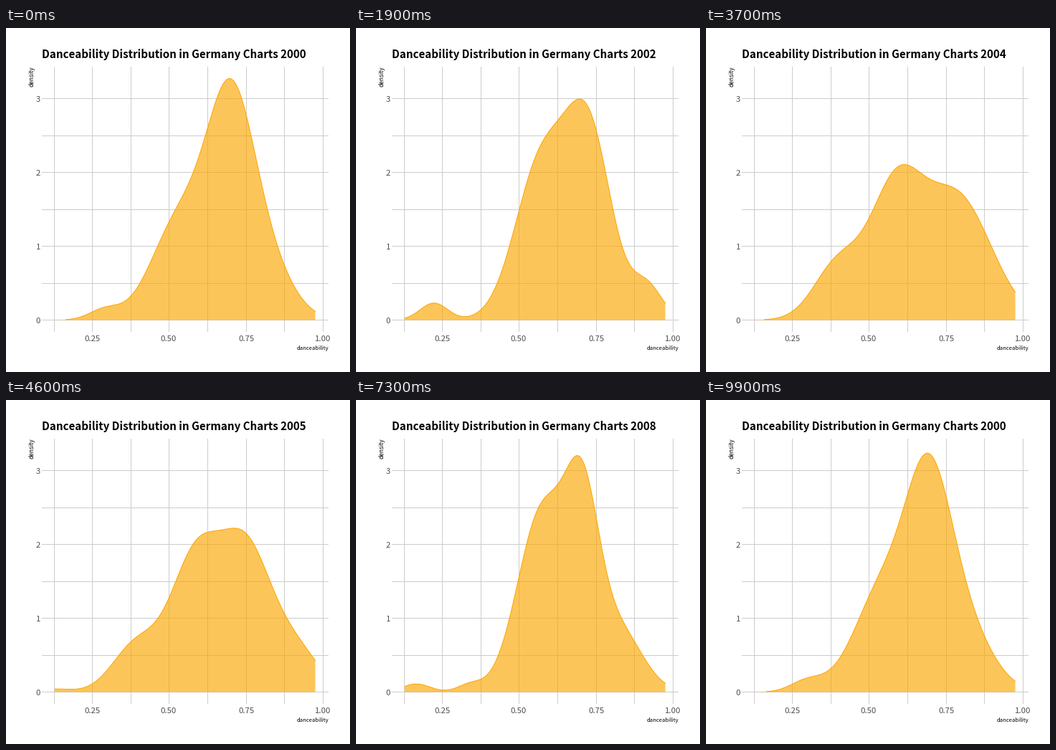
Write a matplotlib script that moves like this. It is 480 px wide and 480 px high and loops after 10000 ms.

```python
import numpy as np
import matplotlib.pyplot as plt
from matplotlib.animation import FuncAnimation

SIZE, DPI = 480, 96
PT = 72 / DPI                        # points per pixel
LEFT, RIGHT, TOP, BOTTOM = 50, 450, 54, 424
FONT = "Noto Sans CJK JP"
ORANGE, FILL, GRID, GREY = "#ffa500", "#faa600", "#cccccc", "#4d4d4d"
X = np.linspace(0.127, 0.975, 512)


def px(value):
    return 120.7 + (value - 0.25) * 428.8


def py(density):
    return 407.5 - 103 * density


def bumps(*parts):
    """Sum of bell curves given as (height, centre, width)."""
    return sum(h * np.exp(-((X - c) / w) ** 2 / 2) for h, c, w in parts)


curves = {
    2000: bumps((.14, .29, .05), (1.29, .53, .09), (2.9, .70, .079),
                (.57, .83, .08)),
    2002: bumps((.23, .222, .045), (2.08, .57, .084), (2.5, .725, .075),
                (.45, .915, .05)),
    2004: bumps((.74, .397, .077), (1.7, .585, .085), (1.66, .786, .11)),
    2006: bumps((.08, .13, .05), (.52, .385, .075), (1.78, .585, .08),
                (2.24, .744, .076), (.56, .93, .07)),
    2008: bumps((.11, .165, .045), (.1, .34, .04), (2.45, .575, .08),
                (2.2, .705, .055), (.85, .82, .078)),
    2009: bumps((.4, .31, .06), (2.2, .535, .083), (1.85, .74, .1)),
    2010: bumps((.24, .33, .06), (1.15, .535, .075), (2.9, .675, .075),
                (.8, .84, .085)),
}
for year in (2001, 2003, 2005, 2007):
    curves[year] = (curves[year - 1] + curves[year + 1]) / 2

YEARS = list(range(2000, 2011))
STARTS = [5, 15] + list(range(25, 98, 9))
STEPS = [5, 5] + [4] * 9


def state(frame):
    """Return the title year and the density curve of a frame."""
    year, curve = YEARS[0], curves[YEARS[0]]
    for i, (start, steps) in enumerate(zip(STARTS, STEPS)):
        if frame < start:
            break
        t = min((frame - start + 1) / steps, 1)
        here, after = YEARS[i], YEARS[(i + 1) % len(YEARS)]
        year = after if t >= 0.5 else here
        curve = (1 - t) * curves[here] + t * curves[after]
    return year, curve


fig = plt.figure(figsize=(SIZE / DPI, SIZE / DPI), dpi=DPI, facecolor="white")
ax = fig.add_axes([0, 0, 1, 1])
ax.set_xlim(0, SIZE)
ax.set_ylim(SIZE, 0)
ax.axis("off")


def label(x, y, text, size, **style):
    return ax.text(x, y, text, fontsize=size * PT, family=FONT, **style)


def grid_line(xs, ys):
    ax.plot(xs, ys, color=GRID, lw=PT, snap=False,
            solid_capstyle="butt", zorder=1)


# Grid lines sit on pixel centres so that they stay crisp
for k in range(1, 9):
    x = np.floor(px(k / 8)) + 0.5
    grid_line([x, x], [TOP, BOTTOM])
    if k % 2 == 0:
        label(x - 0.5, 437, f"{k / 8:.2f}", 11.3, color=GREY,
              ha="center", va="baseline")
for k in range(7):
    y = np.floor(py(k / 2)) + 0.5
    grid_line([LEFT, RIGHT], [y, y])
    if k % 2 == 0:
        label(48, y + 4.5, str(k // 2), 11.3, color=GREY,
              ha="right", va="baseline")

label(RIGHT, 449, "danceability", 7.7, ha="right", va="baseline")
label(40.5, TOP - 1, "density", 8.4, rotation=90, ha="right", va="top")
title = label(LEFT, 42, "", 15.1, weight="bold", va="baseline")

area, = ax.fill([0], [0], color=FILL, alpha=0.65, lw=0, zorder=3)
outline, = ax.plot([], [], color=ORANGE, lw=PT, zorder=4)


def draw(frame):
    year, curve = state(frame)
    xs, ys = px(X), py(curve)
    area.set_xy(np.column_stack([np.r_[xs, xs[-1], xs[0]],
                                 np.r_[ys, py(0), py(0)]]))
    outline.set_data(xs, np.where(curve > 0.006, ys, np.nan))
    title.set_text(f"Danceability Distribution in Germany Charts {year}")
    return area, outline, title


anim = FuncAnimation(fig, draw, frames=100, interval=100,
                     repeat=True, repeat_delay=0, blit=False)
plt.show()
```
